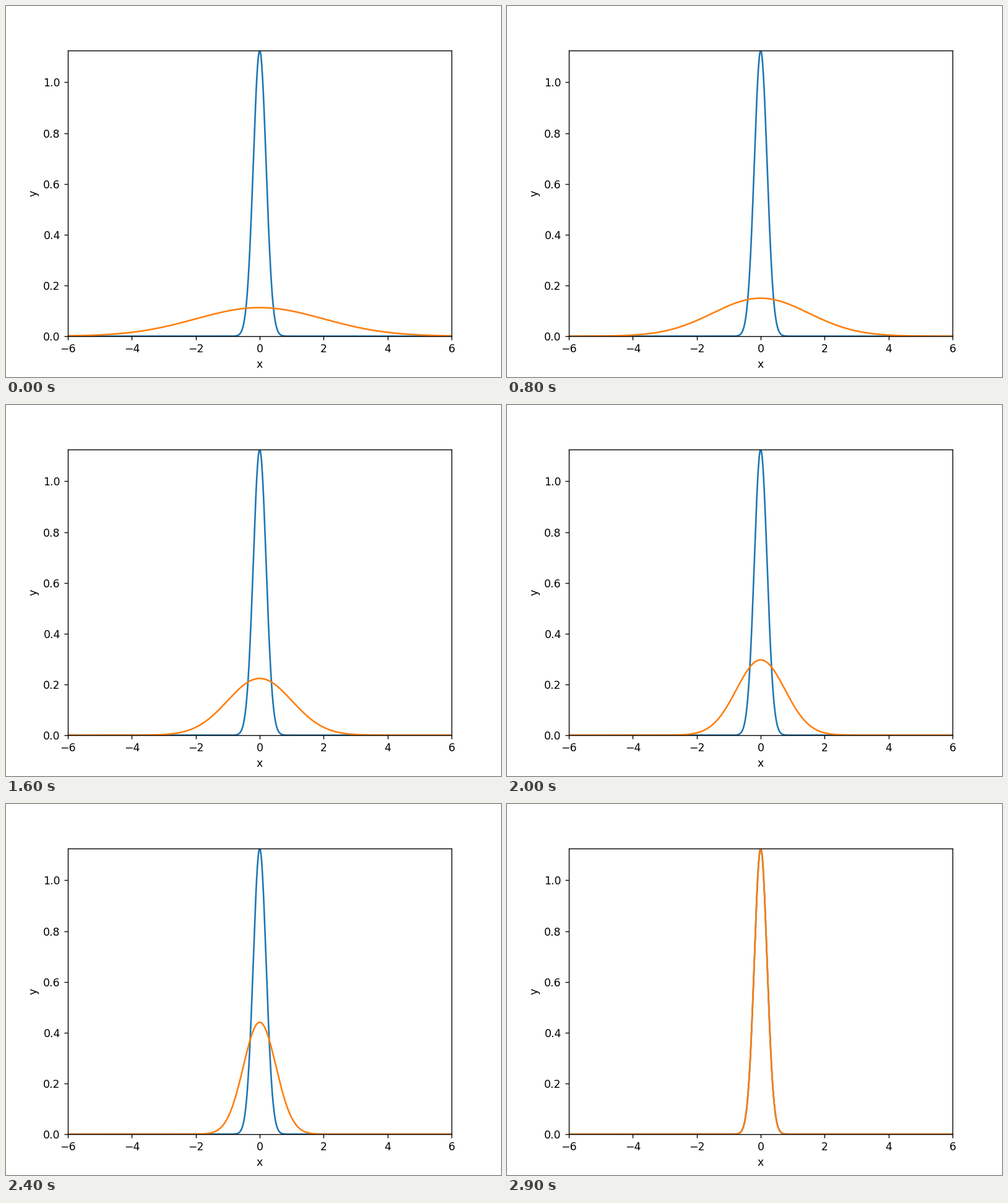
These frames come from a looping animation (800 px wide and 600 px high, 3000 ms). A matplotlib script:

```python
import numpy as np
import matplotlib.pyplot as plt
from matplotlib.animation import FuncAnimation

FRAMES = 30
SIGMAS = np.linspace(2.0, 0.2, FRAMES)


def bell(x, sigma):
    return np.exp(-x**2 / (2 * sigma**2)) / (np.sqrt(2) * np.pi * sigma)


x = np.linspace(-6, 6, 1001)
narrow = bell(x, SIGMAS[-1])

fig, ax = plt.subplots(figsize=(6.4, 4.8), dpi=125)
ax.plot(x, narrow)
curve, = ax.plot(x, bell(x, SIGMAS[0]))
ax.set_xlim(-6, 6)
ax.set_ylim(0, narrow.max())
ax.set_xlabel("x")
ax.set_ylabel("y")


def update(i):
    curve.set_ydata(bell(x, SIGMAS[i]))
    return curve,


anim = FuncAnimation(fig, update, frames=FRAMES, interval=100, repeat=True)
plt.show()
```
